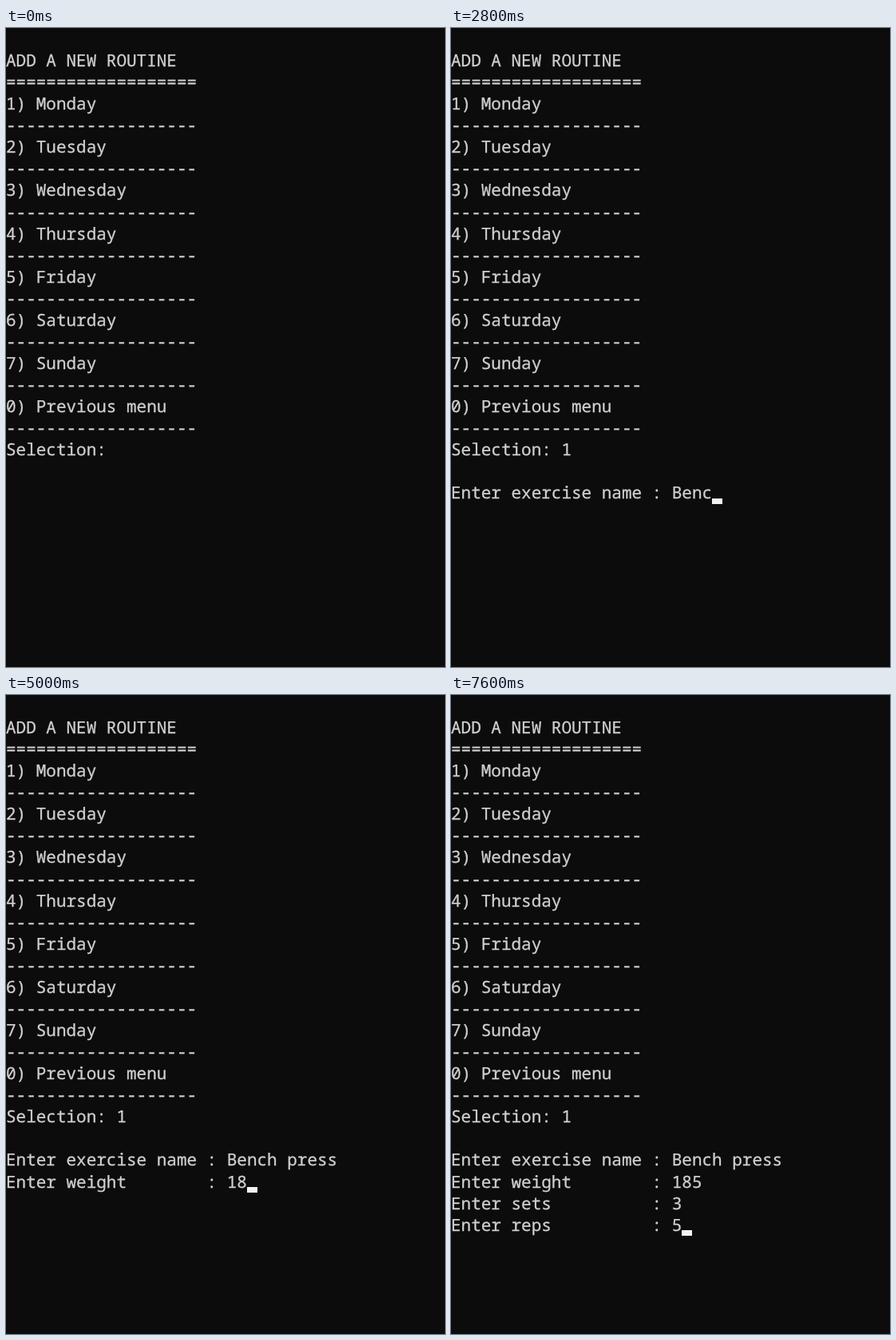
These frames come from a looping animation (550 px wide and 800 px high, 8000 ms). An HTML page:

```html
<!DOCTYPE html>
<html lang="en">
<head>
<meta charset="utf-8">
<title>Add a new routine</title>
<style>
  html, body { margin: 0; height: 100%; overflow: hidden; background: #0c0c0c; }
  svg { display: block; }
  text {
    font: 20.97px "Noto Sans Mono", monospace;
    fill: #d0d0d0;
    stroke: #d0d0d0;
    stroke-width: .3px;
    white-space: pre;
    text-rendering: geometricPrecision;
  }
  rect { fill: #f2f2f2; shape-rendering: crispEdges; }
</style>
</head>
<body>
<svg id="screen" width="550" height="800"></svg>
<script>
const LOOP = 8000, CELL_W = 12.58, CELL_H = 27.07, BASELINE = 21, CURSOR_H = 6.7;
const screen = document.getElementById('screen');

const days = ['Monday', 'Tuesday', 'Wednesday', 'Thursday', 'Friday', 'Saturday', 'Sunday'];
const rule = mark => mark.repeat(19) + '\n';
const item = (key, label) => `${key}) ${label}\n` + rule('-');
const prompt = label => '\n' + ('Enter ' + label).padEnd(20) + ': ';

const menu = '\nADD A NEW ROUTINE\n' + rule('=') +
  days.map((day, i) => item(i + 1, day)).join('') +
  item(0, 'Previous menu') + 'Selection: ';

// [time, output]; output shows the cursor, an entry without it blinks the cursor
const events = [
  [500], [1100, '1'], [1500, '\n' + prompt('exercise name')], [2100],
  [2400, 'B'], [2600, 'e'], [2700, 'n'], [2800, 'c'], [2900, 'h'],
  [3100, ' '], [3200, 'p'], [3300, 'r'], [3400, 'e'], [3600, 's'], [3700, 's'],
  [3900, prompt('weight')], [4700], [4800, '1'], [5000, '8'], [5200, '5'],
  [5700, prompt('sets')], [6400], [6700, '3'],
  [6900, prompt('reps')], [7600, '5'],
];

function render(count) {
  let output = menu, cursor = false;
  for (const [, text] of events.slice(0, count)) {
    output += text || '';
    cursor = text ? true : !cursor;
  }
  const lines = output.split('\n');
  const row = lines.length - 1, col = lines[row].length;
  screen.innerHTML = lines.map((line, i) =>
    `<text x="0" y="${i * CELL_H + BASELINE}">${line}</text>`).join('') +
    (cursor ? `<rect x="${col * CELL_W}" y="${(row + 1) * CELL_H - CURSOR_H}" width="${CELL_W}" height="${CURSOR_H}"/>` : '');
}

let shown = -1;
function tick() {
  const time = performance.now() % LOOP;
  const count = events.filter(([at]) => at <= time).length;
  if (count !== shown) render(shown = count);
  requestAnimationFrame(tick);
}
tick();
</script>
</body>
</html>
```
